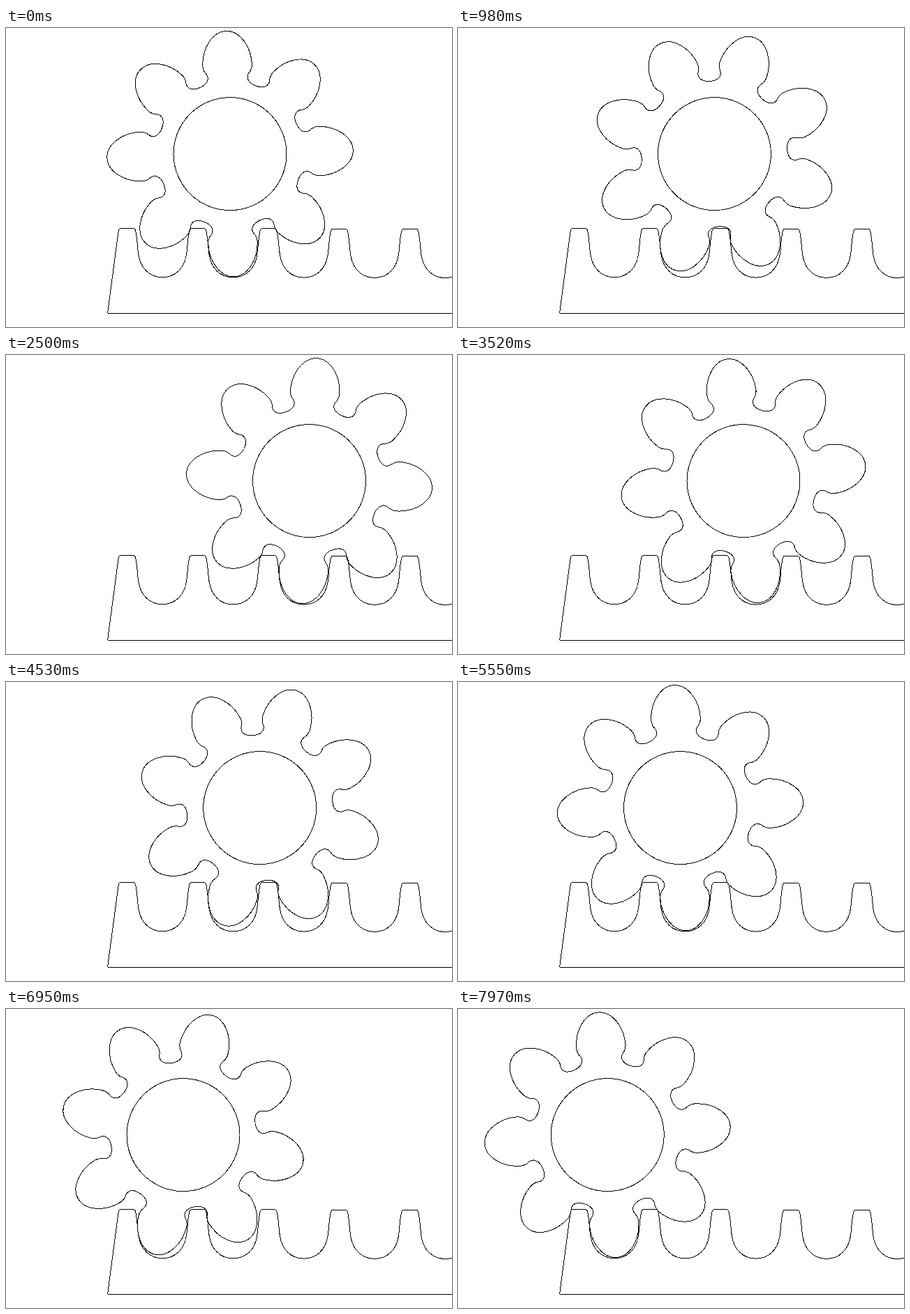
An HTML page that plays this animation: 639x429 px, repeating every 8000 ms.

```html
<!DOCTYPE html>
<html lang="en">
<head>
<meta charset="utf-8">
<title>Rack and pinion</title>
<style>
  html, body { margin: 0; width: 100%; height: 100%; overflow: hidden; background: #fff; }
  svg { display: block; width: 639px; height: 429px; }
  g { fill: none; stroke: #000; stroke-width: 1; shape-rendering: crispEdges; }
</style>
</head>
<body>
<svg viewBox="0 0 639 429">
  <defs>
    <path id="half" d="M0-176.3C19.5-176.3 35.3-153 35.3-127C35.3-124 34.4-121.9 33.4-119.4
      C32.2-116.6 30.6-116.2 29.2-112.9C26.3-106 31.6-99.9 39.95-96.45"/>
    <g id="tooth"><use href="#half"/><use href="#half" transform="scale(-1 1)"/></g>
  </defs>
  <g>
    <path id="rack"/>
    <g id="gear"><circle r="81"/></g>
  </g>
</svg>
<script>
const LOOP = 8000, STEP = 127, LEAD = 42;
const PITCH_RADIUS = 128.95, MESH_X = 325, AXLE_Y = 180.6;
const gear = document.getElementById('gear');

for (let i = 0; i < 8; i++) {
  const tooth = document.createElementNS('http://www.w3.org/2000/svg', 'use');
  tooth.setAttribute('href', '#tooth');
  tooth.setAttribute('transform', `rotate(${i * 45})`);
  gear.append(tooth);
}

// One tooth top and the gap after it; the rack sinks slightly to the right
const crest = 'h19q2.5 0 3.5 8.5';
const gapDown = 'c2 12 2 22 3.5 30c3 19 16 31.7 34.15 31.7';
const gapUp = 'c18.15 0 31.15-12.7 34.15-31.7c1.5-8 1.5-18 3.5-30q1-8.3 3.5-8.3';
document.getElementById('rack').setAttribute('d',
  'M145.5 409.5L160.5 296q1-8.5 3.5-8.5' + (crest + gapDown + gapUp).repeat(5) + 'V409.5H145.5');

// Axle position by tick: out, back, a short pause, on to the left
const path = [[0, 321], [22, 434.5], [24, 441.5], [31, 409], [49, 318.5], [61, 254], [63, 254], [70, 214.2]];

function axleX(tick) {
  const i = Math.max(1, path.findIndex(([k]) => k >= tick));
  const [k0, x0] = path[i - 1], [k1, x1] = path[i];
  return x0 + (x1 - x0) * (tick - k0) / (k1 - k0);
}

function draw(time) {
  const n = Math.min(63, Math.floor((time % LOOP + LEAD) / STEP));
  const tick = n + Math.floor(n / 8); // every eighth step is a double one
  const x = axleX(tick);
  const angle = (x - MESH_X) / PITCH_RADIUS * 180 / Math.PI;
  gear.setAttribute('transform', `translate(${x} ${AXLE_Y}) rotate(${angle})`);
}

const start = performance.now();
function loop() {
  draw(performance.now() - start);
  requestAnimationFrame(loop);
}
loop();
</script>
</body>
</html>
```
